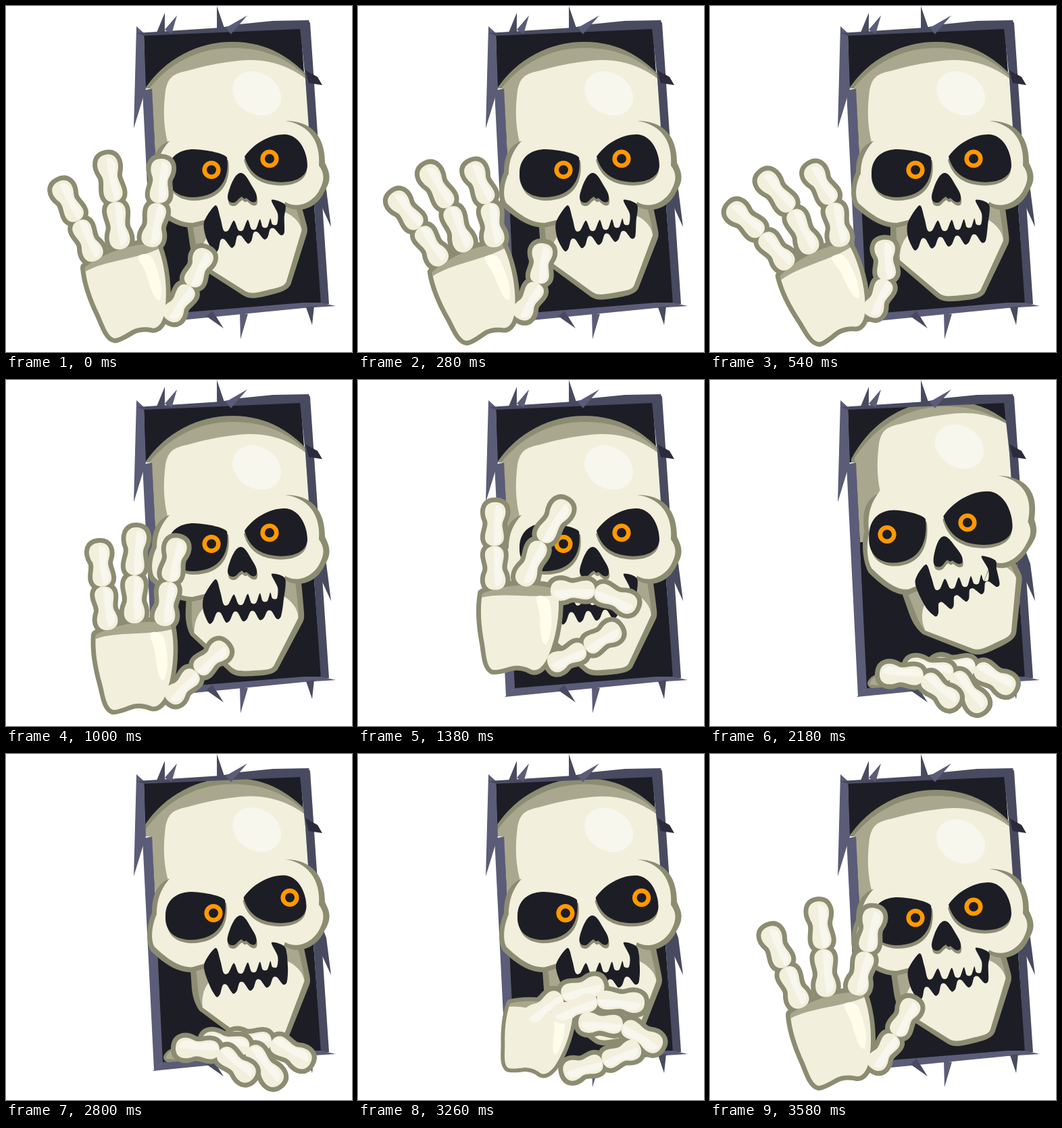
Animation of 512x512 px, one loop 3600 ms. Source, as an HTML page with a canvas:

```html
<!DOCTYPE html>
<html lang="en">
<head>
<meta charset="utf-8">
<title>Waving skeleton</title>
<style>
html, body { margin: 0; width: 100%; height: 100%; overflow: hidden; background: #fff; }
canvas { display: block; width: 512px; height: 512px; }
</style>
</head>
<body>
<canvas id="stage" width="512" height="512"></canvas>
<script>
const ctx = document.getElementById('stage').getContext('2d');
const LOOP = 3600, RAD = Math.PI / 180;
const DARK = '#1d1d26', BONE = '#f2efdc', SHADE = '#a9a78e', LINE = '#8c8c72',
      GLOSS = '#f8f7ee', SLATE = '#484a60', SLATE2 = '#5b5c78', ORANGE = '#ff9900';

const fill = (d, color) => { ctx.fillStyle = color; ctx.fill(new Path2D(d)); };
const poly = points => 'M' + points + 'Z';
const blend = (a, b, k) => a.map((v, i) => v + (b[i] - v) * k);
const turned = (x, y, deg) => {
  const c = Math.cos(deg * RAD), s = Math.sin(deg * RAD);
  return [x * c - y * s, x * s + y * c];
};
const at = (x, y, draw, deg = 0, sx = 1, sy = sx) => {
  ctx.save();
  ctx.translate(x, y);
  ctx.rotate(deg * RAD);
  ctx.scale(sx, sy);
  draw();
  ctx.restore();
};

// Cyclic monotone cubic track: keys are [time, values], the last repeats the first.
function track(keys) {
  const n = keys.length - 1;
  const slope = (i, c) => {
    const [a, b] = [keys[(i + n) % n], keys[(i + n) % n + 1]];
    return (b[1][c] - a[1][c]) / (b[0] - a[0]);
  };
  const tangent = (i, c) => {
    const p = slope(i - 1, c), q = slope(i, c);
    return p * q <= 0 ? 0 : 2 * p * q / (p + q);
  };
  return t => {
    let i = 0;
    while (i < n - 1 && keys[i + 1][0] <= t) i++;
    const [t0, a] = keys[i], [t1, b] = keys[i + 1], h = t1 - t0, u = (t - t0) / h, w = 1 - u;
    return a.map((v, c) => v * w * w * (1 + 2 * u) + b[c] * u * u * (3 - 2 * u)
      + h * u * w * (w * tangent(i, c) - u * tangent(i + 1, c)));
  };
}

// --- Motion ---
// Hand: wrist x, y, palm angle, finger fan, lean, curl, fold, grip on the ledge.
const middle = [165, 492, -10, 18, 3, -4, 0, 0];
const left = [166, 497, -18, 15, -8, -14, 0, 0];
const right = [162, 489, 0, 7.5, 0, 3, 0, 0];
const pinch = [203, 430, 5, 26, 19, 8, 39, 0];
const grip = [238, 497, 20, 26, 19, 8, 39, 1];
const farLeft = blend(middle, left, 1.2);
const hand = track([[0, middle], [210, farLeft], [400, blend(middle, right, .8)], [540, left],
  [590, farLeft], [940, right], [1000, right], [1090, blend(right, middle, .2)], [1380, pinch],
  [1620, grip], [3190, grip], [3340, pinch], [3580, blend(middle, left, -.15)], [LOOP, middle]]);

// Head: turn, lift, jaw swing, look (-1 left, 1 right).
const idle = [0, 0, 1, 0], bite = [0, 0, 0, 0], leer = [1, 1, 0, -1], glance = [0, .5, 0, 1];
const head = track([[0, idle], [540, bite], [1000, [0, 0, -.3, 0]], [1500, bite], [2040, leer],
  [2320, leer], [2700, glance], [3240, glance], [3540, idle], [LOOP, idle]]);

// --- Doorway ---
const bars = [
  ['193 30 204 40 207 122 189 181', SLATE2],
  ['202 125 216 122 232 456 219 468', SLATE2],
  ['193 40 225 38 318 32 345 27 395 22 449 21 436 34 204 44', SLATE],
  ['447 21 450 25 478 441 466 442 443 107 435 33', SLATE],
  ['217 469 232 456 440 439 466 439 488 444 440 447', SLATE2]
];
const spikes = [
  [235, 10, 229, 40], [253, 14, 240, 38], [312, 0, 318, 36], [357, 14, 329, 37],
  [322, 477, 301, 455], [347, 493, 352, 455], [453, 472, 450, 445]
];

function spike([x, y, bx, by], i) {
  const [nx, ny] = turned(6, 0, Math.atan2(by - y, bx - x) / RAD + 90);
  fill(poly([x, y, bx + nx, by + ny, bx - nx, by - ny]), i % 2 ? SLATE2 : SLATE);
}

function doorway() {
  bars.forEach(([p, c]) => fill(poly(p), c));
  spikes.forEach(spike);
  fill(poly('462 240 474 272 481 327 464 290'), SLATE);
  fill(poly('443 95 461 105 468 117 448 114'), '#2b2b3b');
}

// --- Skull ---
const OPENING = poly('204 43 435 33 443 107 448 170 455 240 222 240 216 122 206 122');

function cranium(turn, up) {
  const dx = 14 * turn, dy = 4 * turn - 35 * up;
  ctx.save();
  ctx.clip(new Path2D(OPENING));
  at(dx, dy + 8 * turn, () => {
    fill('M195 140C225 82 280 53 335 53C390 53 430 80 462 122V280H195Z', LINE);
    fill('M200 138C236 84 285 62 335 62C388 62 425 82 450 112V280H200Z', SHADE);
  });
  at(dx, dy, () => fill('M240 205C232 175 233 150 236 125C240 105 248 100 268 96C300 87 330 81 360 80C400 79 432 97 449 112L470 280H240Z', BONE));
  ctx.restore();
  at(371 - 2 * turn, 129.5 + dy, () => {
    ctx.fillStyle = GLOSS;
    ctx.beginPath();
    ctx.ellipse(0, 0, 38, 30.5, 0, 0, 7);
    ctx.fill();
  }, 32);
}

// Angle and shift of the jaw.
const jawPose = (turn, up, swing) =>
  [-11.4 * turn - 8 * up - 8 * swing, 10 * turn + 16 * up + 5 * swing, -12 * turn - 8 * up - swing];

function drawJaw([deg, dx, dy]) {
  at(330 + dx, 350 + dy, () => {
    ctx.translate(-330, -350);
    fill('M267 312V345C267 360 271 372 276 380L334 430C343 438 352 438 372 436C392 434 402 432 407 424L441 353C444 346 442 340 441 330L436 292H300Z', LINE);
    fill('M275 312L276 345C276 358 278 368 281 376L338 424C345 430 352 430 370 428C390 426 397 426 401 419L433 350C435 345 434 340 433 330L427 292H300Z', SHADE);
    fill('M281 376C280 358 286 345 297 335L300 300H411V316C422 322 433 333 434 347L401 419C397 426 390 426 370 428C352 430 345 430 338 424Z', BONE);
  }, deg);
}

const rim = 'M241 200C224 207 216 222 216 246C208 262 207 285 214 297C232 313 252 328 276 328L299 322L325 340L400 328L413 296C436 310 462 296 471 275C482 258 480 248 472 232C472 192 452 170 413 170Z';
const face = 'M241 201C231 212 223 226 223 248C215 264 214 283 220 292C236 306 254 321 276 321L297 316L325 340L400 328L413 290C434 302 456 288 464 272C472 257 471 247 463 236C466 196 444 174 413 170L400 160L252 188Z';
const socketL = 'M239 248C239 222 258 212 278 212C300 213 322 218 327 224C331 252 320 283 275 283C250 282 238 268 239 248Z';
const socketR = 'M353 223C364 206 388 190 412 190C434 190 446 216 446 236C446 256 420 263 398 260C372 257 359 244 353 223Z';
const nose = 'M347 247C353 247 357 254 362 263C368 273 374 281 370 289C365 293 360 288 356 284Q352 287 349 282C343 285 341 292 335 291C326 290 327 281 331 270C335 258 341 247 347 247Z';

// Bends the cheeks as the head turns and lifts.
const bend = (d, turn, up) => d.replace(/(\d+) (\d+)/g, (_, x, y) => {
  const u = (x - 345) / 130, v = (y - 255) / 60;
  return [+x + turn * (9 - 5 * u - 10 * u * v), +y + up * (6 * v * (1 - u) - 23 - 3 * u)]
    .map(n => n.toFixed(2)).join(' ');
});

function features(turn, up, look) {
  const cut = (d, cx, cy, dx, dy, sx, sy, shade, deg = 0) => {
    const draw = color => () => {
      ctx.translate(-cx, -cy);
      fill(d, color);
    };
    at(cx + dx + shade, cy + dy + 5, draw(LINE), deg, sx, sy);
    at(cx + dx, cy + dy, draw(DARK), deg, sx, sy);
  };
  cut(socketL, 284, 247, -6 * up, -16 * up, 1 - .05 * turn, 1 + .1 * turn, 2);
  cut(socketR, 400, 225, -3 * up, -21 * up, 1 + .1 * turn, 1 + .12 * turn, -1);
  cut(nose, 349, 270, 2 * turn - up, -16 * up, 1, 1, 1, -7 * turn);

  const eye = (x, y) => {
    ctx.beginPath();
    ctx.arc(x, y, 10.3, 0, 7);
    ctx.lineWidth = 6.6;
    ctx.strokeStyle = ORANGE;
    ctx.stroke();
  };
  eye(304 + look * (look < 0 ? 42 : 3), 242.5 - 14 * up);
  eye(390 + look * (look < 0 ? 9 : 30), 226 - 15 * up - 6 * Math.max(look, 0));
}

const upperTeeth = [[293, 320], [310, 295], [317, 313]], lowerTeeth = [[411, 325]];
for (let i = 0; i < 5; i++) {
  const s = i / 4, p = s + .125, x = s => 326 + 92 * s - 20 * s * s, y = 332 - 9 * s * s;
  upperTeeth.push([x(s) - 4, y], [x(s) + 3, y]);
  if (i < 4) upperTeeth.push([x(p), 318 - 4 * p]);
  const lx = 404 - 100 * s, ly = 350 + 11 * s;
  lowerTeeth.push([lx + 4, ly - 3], [lx - 2, ly]);
  if (i < 4) lowerTeeth.push([lx - 10, 338 + 8 * p], [lx - 16, 338 + 8 * p]);
}
upperTeeth.push([402, 307], [393, 287], [413, 294]);
lowerTeeth.push([293, 342]);

const shifted = (points, cx, cy, [deg, dx, dy]) => points.map(([x, y]) => {
  const [rx, ry] = turned(x - cx, y - cy, deg);
  return [cx + dx + rx, cy + dy + ry];
});

function mouth(turn, up, jaw) {
  const p = [...shifted(upperTeeth, 350, 310, [-3 * turn, 10 * turn, -8 * turn - 16 * up]),
             ...shifted(lowerTeeth, 330, 350, jaw)];
  const n = p.length, pt = i => p[(i + n) % n];
  ctx.beginPath();
  ctx.moveTo(...p[0]);
  p.forEach((a, i) => {
    const z = pt(i - 1), b = pt(i + 1), c = pt(i + 2);
    ctx.bezierCurveTo(a[0] + (b[0] - z[0]) / 7, a[1] + (b[1] - z[1]) / 7,
      b[0] - (c[0] - a[0]) / 7, b[1] - (c[1] - a[1]) / 7, ...b);
  });
  ctx.fillStyle = DARK;
  ctx.fill();
}

// --- Hand ---
const palmEdge = 'C88 -95 86 -55 75 -25C70 -12 62 -4 54 -6C45 -10 32 -12 22 -8C14 -5 2 0 -4 -1C-14 -5 -16 -25 -20 -40C-27 -65 -31 -90 -29 -112Z';
const palm = 'M-29 -112C-5 -126 50 -138 82 -126' + palmEdge;
const palmFront = 'M-29 -106C0 -117 50 -111 83 -120' + palmEdge;
const palmGloss = 'M52 -115C60 -118 70 -116 73 -104C78 -80 79 -60 72 -45C64 -43 61 -65 59 -82C57 -100 49 -108 52 -115Z';

// Fingers, then thumb: root on the palm and bone length.
const roots = [[-10, -119, 65], [28, -129, 71], [71, -125, 66], [78, -14, 60]];
// Fingers laid over the ledge: root, then the angles of both bones.
const ledge = [[251, 434, 94, 130], [290, 424, 98, 141], [327, 425, 90, 120]];

function outline(d) {
  ctx.strokeStyle = ctx.fillStyle = LINE;
  ctx.lineWidth = 14;
  ctx.lineJoin = 'round';
  const p = new Path2D(d);
  ctx.fill(p);
  ctx.stroke(p);
}

// A knobbly bone of length l along x.
function bone(l, side, edge) {
  const half = s => `C0 ${s * 15} ${l * .2} ${s * 19} ${l * .42} ${s * 12}`
    + `C${l * .54} ${s * 9} ${l * .66} ${s * 14} ${l * .8} ${s * 14}C${l * .93} ${s * 14} ${l} ${s * 8} ${l} 0`;
  const shape = `M0 0${half(1)}L0 0${half(-1)}L0 0Z`;
  if (edge) return outline(shape);
  fill(shape, BONE);
  at(l * .07, 0, () => fill(`M0 0${half(1)}Q${l * .5} -4 0 0Z`, GLOSS), 0, .9, .75 * side);
}

function finger([x, y, a1, a2], l, edge, lit = 1) {
  const [mx, my] = turned(0, -l, a1), [tx, ty] = turned(0, -l, a2);
  at(x, y, () => bone(l, lit, edge), a1 - 90);
  at(x + mx + tx, y + my + ty, () => bone(l, -lit, edge), a2 + 90);
}

function drawHand(t) {
  const [x, y, deg, fan, lean, curl, fold, hold] = hand(t);
  const joints = roots.map(([rx, ry], i) => {
    const k = i - 1, [dx, dy] = turned(rx, ry, deg);
    if (i === 3) {
      const a = deg + 44 + fold * .4;
      return [x + dx, y + dy, a, a + (fold ? -6 : 2 * curl - 2)];
    }
    const bent = i === 2 ? fold : 0, a = deg + lean + fan * k + bent;
    const free = [x + dx, y + dy, a, a + curl * (1 + k / 2) + bent * .3];
    return blend(free, ledge[i], hold);
  });
  const draw = (i, edge, lit) => finger(joints[i], roots[i][2], edge, lit);

  if (hold > .97) {
    outline('M240 449Q243 443 252 441V448Z');
    fill('M236 451C238 442 244 438 252 436V452Z', SHADE);
    for (const i of [2, 1, 0]) {
      draw(i, true);
      draw(i, false, -1);
    }
    return;
  }
  const scale = 1 - .3 * hold;
  at(x, y, () => outline(palm), deg, scale);
  joints.forEach((_, i) => draw(i, true));
  at(x, y, () => {
    fill(palm, SHADE);
    fill(palmFront, BONE);
    fill(palmGloss, '#fffdec');
  }, deg, scale);
  joints.forEach((_, i) => draw(i, false));
}

function render(t) {
  const [turn, up, swing, look] = head(t), jaw = jawPose(turn, up, swing);
  ctx.clearRect(0, 0, 512, 512);
  fill(poly('204 42 436 32 467 441 231 458 216 122 206 122'), DARK);
  cranium(turn, up);
  doorway();
  drawJaw(jaw);
  fill(bend(rim, turn, up), LINE);
  fill(bend(face, turn, up), BONE);
  features(turn, up, look);
  mouth(turn, up, jaw);
  drawHand(t);
}

const start = performance.now();
function tick() {
  render((performance.now() - start) % LOOP);
  requestAnimationFrame(tick);
}
tick();
</script>
</body>
</html>
```
